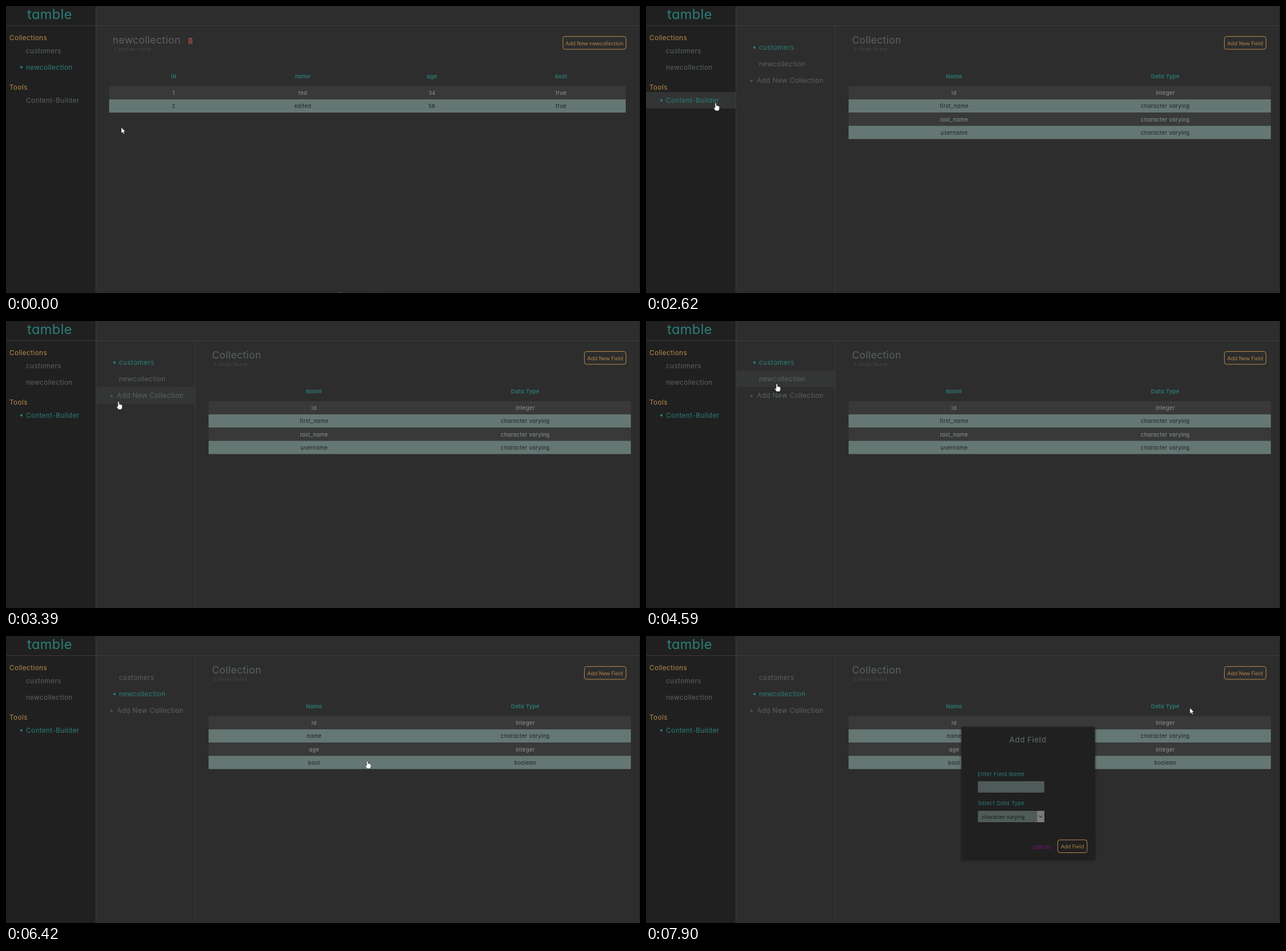
Recreate the animation shown at these times as an HTML page. Size 1111x504 px, loop 8000 ms.

```html
<!DOCTYPE html>
<html lang="en">
<head>
<meta charset="utf-8">
<title>Admin panel</title>
<style>
  html, body { margin: 0; width: 100%; height: 100%; overflow: hidden; background: #2d2d2d; }
  svg { display: block; font-family: Inter, sans-serif; letter-spacing: .026em; font-feature-settings: "cv11"; }
  .ui { font-family: "Open Sans", "Noto Sans", sans-serif; letter-spacing: 0; }
  .modal { filter: drop-shadow(0 1px 2px #151515); }
</style>
</head>
<body>
<svg id="stage" width="1111" height="504" viewBox="0 0 1111 504"></svg>
<script>
const LOOP = 8000;
const TEAL = '#2a7f78', GOLD = '#b98a4a', GREY = '#5a6361', PALE = '#8c9a97', DARK = '#202020', LINE = '#3b3b3b';
const OPEN_BUILDER = 2620, PICK_COLLECTION = 4680, OPEN_MODAL = 7510;

// Pointer moves: start, end, number of steps, destination
const START = [202, 213];
const MOVES = [
  [1030, 1410, 5, 122, 170],
  [3010, 3480, 6, 203, 139],
  [3790, 3980, 3, 229, 110],
  [5270, 5660, 5, 611, 177],
  [5840, 6130, 4, 619, 224],
  [6330, 7100, 9, 1025, 79],
  [7810, 7900, 2, 953, 126]
];

const rect = (x, y, w, h, fill, more = '') =>
  `<rect x="${x}" y="${y}" width="${w}" height="${h}" fill="${fill}" ${more}/>`;
const text = (x, y, str, size, fill, more = '') =>
  `<text x="${x}" y="${y}" font-size="${size}" fill="${fill}" ${more}>${str}</text>`;
const centred = (x, y, str, size, fill, more = '') =>
  text(x, y, str, size, fill, 'text-anchor="middle" ' + more);

function pointerAt(t) {
  let [x, y] = START;
  for (const [t0, t1, n, tx, ty] of MOVES) {
    if (t < t0) break;
    const p = Math.min(1, (Math.floor((t - t0) / (t1 - t0) * (n - 1)) + 1) / n);
    const e = p * p * (3 - 2 * p);
    x += (tx - x) * e;
    y += (ty - y) * e;
  }
  return { x, y };
}

function navItem(x, y, label, active) {
  const dot = active ? `<circle cx="${x - 8}" cy="${y - 4}" r="2.1" fill="${TEAL}"/>` : '';
  return dot + text(x, y, label, 11.7, active ? TEAL : GREY);
}

function button(x, y, w, h, label, color) {
  return rect(x + .5, y + .5, w - 1, h - 1, 'none', `rx="4" stroke="${color}"`) +
    centred(x + w / 2, y + h / 2 + 4, label, 9.4, color, 'class="ui"');
}

function table(x, w, head, rows) {
  const col = w / head.length, rowH = 23.25;
  const line = (cells, y, fill, more) =>
    cells.map((c, i) => centred(x + col * (i + .5), y, c, 9.3, fill, more)).join('');
  return line(head, 127, TEAL, 'font-weight="600"') + rows.map((cells, i) => {
    const y = 140.7 + i * rowH;
    return rect(x, y, w, rowH, i % 2 ? '#647773' : '#393939') +
      line(cells, y + 15.3, i % 2 ? '#1b2020' : PALE);
  }).join('');
}

function heading(x, title, note) {
  return text(x, 66, title, 17.4, GREY) + text(x + 2.5, 79.3, note, 8.2, '#444a49');
}

function sidebar(builder, hover) {
  return rect(0, 0, 157, 504, DARK) +
    (hover ? rect(0, 151, 157, 29, '#323434') : '') +
    rect(0, 34, 1111, 1, LINE) + rect(157, 0, 1, 504, LINE) + rect(1110, 0, 1, 504, '#242424') +
    centred(76.5, 23, 'tamble', 23.6, TEAL) +
    text(6, 59.5, 'Collections', 11.7, GOLD) +
    navItem(35, 82.5, 'customers') +
    navItem(35, 111.5, 'newcollection', !builder) +
    text(6, 146.5, 'Tools', 11.7, GOLD) +
    navItem(35, 169.7, 'Content-Builder', builder);
}

function entriesPage() {
  const trash = `<path d="M319.5 58.2h7.4M321.8 58v-1.5h2.8V58M320.4 59.5v6.3h5.6v-6.3M322.2 60v4.5M324.2 60v4.5"
    fill="none" stroke="#b3514d" stroke-width="1.1"/>`;
  return heading(187, 'newcollection', '2 entries found') + trash +
    button(975.5, 53, 111.5, 23.5, 'Add New newcollection', GOLD) +
    table(180.7, 905.3, ['id', 'name', 'age', 'bool'], [[1, 'ted', 34, 'true'], [2, 'edited', 56, 'true']]) +
    `<path d="M583.5 504l2-2 2 2z" fill="${TEAL}"/>` + text(603, 509, 'new product', 8.2, GREY);
}

function builderPage(picked, hoverRow, overButton) {
  const fields = picked
    ? [['id', 'integer'], ['name', 'character varying'], ['age', 'integer'], ['bool', 'boolean']]
    : [['id', 'integer'], ['first_name', 'character varying'], ['last_name', 'character varying'], ['username', 'character varying']];
  return (hoverRow >= 0 ? rect(158, 58 + hoverRow * 29, 173, 29, '#343636') : '') +
    rect(331, 35, 1, 469, LINE) +
    navItem(198, 76.8, 'customers', !picked) +
    navItem(198, 106, 'newcollection', picked) +
    text(181, 135, '+', 11.7, GREY) + text(194.5, 135, 'Add New Collection', 11.7, GREY) +
    heading(361, 'Collection', '3 fields found') +
    button(1013, 53, 74, 23.5, 'Add New Field', overButton ? PALE : GOLD) +
    table(355, 740, ['Name', 'Data Type'], fields);
}

function modal() {
  return rect(553, 160, 233.5, 232.5, DARK, 'class="modal"') +
    centred(669, 187, 'Add Field', 13.6, GREY, 'font-weight="500"') +
    text(581.5, 245.5, 'Enter Field Name', 9.3, TEAL) +
    rect(581.5, 255, 116.5, 20, '#4e5b59', 'rx="1.5"') +
    text(581.5, 297.3, 'Select Data Type', 9.3, TEAL) +
    rect(581.5, 307, 116.5, 20, '#4e5b59', 'rx="1.5"') +
    rect(685.5, 307, 12.5, 20, '#7c7c7c') +
    '<path d="M689 315.5l2.8 3 2.8-3" fill="none" stroke="#3a3a3a" stroke-width="1.2"/>' +
    text(588.5, 321, 'character varying', 9.4, '#141616', 'class="ui"') +
    text(678, 373.7, 'cancel', 9.3, '#84147f') +
    button(721, 357.5, 52.5, 23.5, 'Add Field', GOLD);
}

function pointer(x, y, hand) {
  const d = hand
    ? 'M-1 1Q.2-.7 1.4 1V5Q2.7 4.3 3.5 5.4 4.7 4.9 5.4 6 6.8 5.8 6.8 7.4V10.2L5.5 14H-.3L-3.4 9.2Q-3.2 7.6-1 9Z'
    : 'M0 0V10.6L2.5 8.4 4.1 12 5.8 11.2 4.2 7.8H7.4Z';
  return `<path transform="translate(${x.toFixed(1)} ${y.toFixed(1)})" d="${d}" fill="#fff" stroke="#111" stroke-width=".6"/>`;
}

function scene(t) {
  const { x, y } = pointerAt(t);
  const builder = t >= OPEN_BUILDER;
  const overTool = x < 157 && y >= 151 && y < 180;
  const overList = builder && x >= 157 && x < 331 && y >= 58 && y < 145;
  const overTable = builder && x >= 355 && x < 1095 && y >= 141 && y < 234;
  const overButton = builder && x > 1013 && y < 84;
  const row = overList ? Math.floor((y - 58) / 29) : -1;
  return rect(0, 0, 1111, 504, '#2d2d2d') + sidebar(builder, overTool) +
    (builder ? builderPage(t >= PICK_COLLECTION, row, overButton) : entriesPage()) +
    (t >= OPEN_MODAL ? modal() : '') +
    pointer(x, y, overTool || overList || overTable || overButton);
}

const stage = document.getElementById('stage');
const begin = performance.now();
let shown = '';
function draw() {
  const next = scene((performance.now() - begin) % LOOP);
  if (next !== shown) stage.innerHTML = shown = next;
  requestAnimationFrame(draw);
}
draw();
</script>
</body>
</html>
```
